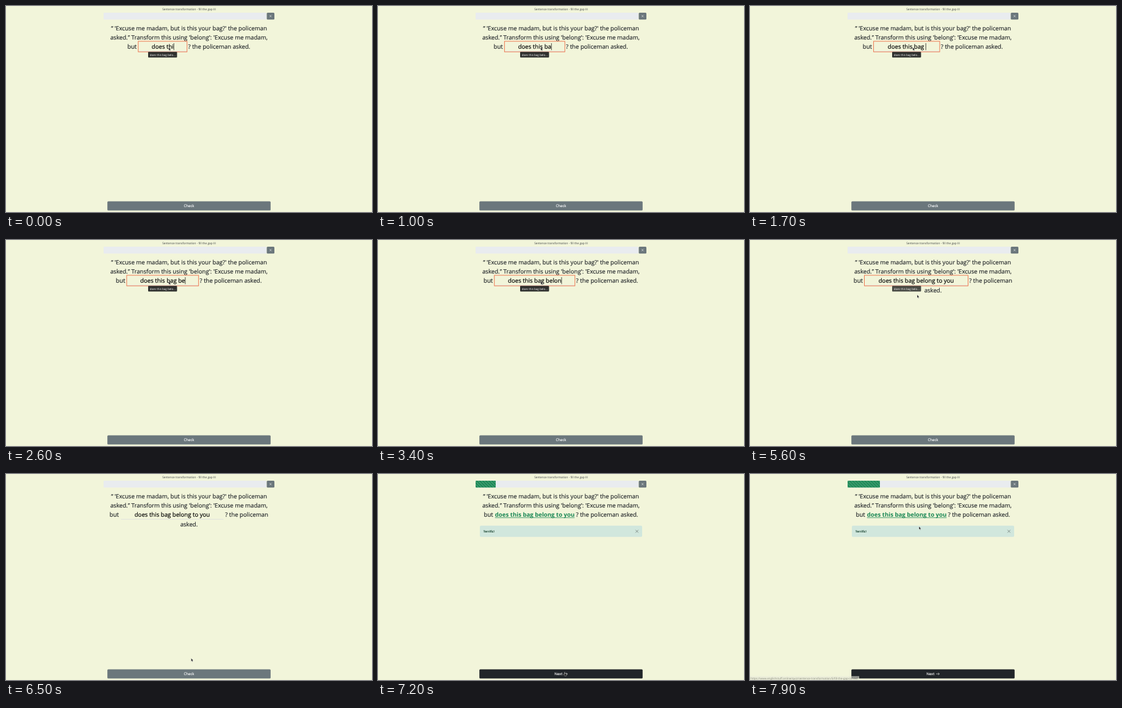
Recreate the animation shown at these times as an HTML page. Size 600x338 px, loop 8 s.

```html
<!DOCTYPE html>
<html lang="en">
<head>
<meta charset="utf-8">
<title>Sentence transformation</title>
<style>
  html, body { margin: 0; width: 100%; height: 100%; overflow: hidden; background: #f2f5da; }
  svg { display: block; width: 600px; height: 338px; }
  text { font-family: "Open Sans", "Noto Sans", sans-serif; white-space: pre; text-rendering: geometricPrecision; }
  .big { font-size: 9.64px; fill: #212529; stroke: #212529; stroke-width: .16px; }
  .input { fill: #000; stroke: #000; stroke-width: .18px; }
  .mid { text-anchor: middle; }
  .btn { font-size: 6.05px; fill: #fff; stroke: #fff; stroke-width: .12px; }
</style>
</head>
<body>
<svg viewBox="0 0 600 338">
  <defs>
    <pattern id="stripes" width="5" height="5" patternUnits="userSpaceOnUse">
      <rect width="5" height="5" fill="#198754"/>
      <path d="M0 0H1.25L5 3.75V5H3.75L0 1.25ZM3.75 0H5V1.25ZM0 3.75L1.25 5H0Z" fill="#fff" opacity=".16"/>
    </pattern>
  </defs>
  <rect width="600" height="338" fill="#f2f5da"/>
  <text class="mid" x="300" y="7.1" font-size="4.78" fill="#3c4043">Sentence transformation - fill the gap III</text>

  <rect x="160" y="11" width="267" height="11.2" rx="1" fill="#e9ecef"/>
  <rect id="bar" x="160" y="11" width="0" height="11.2" rx="1" fill="url(#stripes)"/>
  <rect x="427.5" y="11" width="12.5" height="11.2" rx="1.5" fill="#6b777c"/>
  <path d="M432.1 15l3.2 3.2m0-3.2l-3.2 3.2" stroke="#fff" stroke-width=".6"/>

  <text class="big mid" x="300" y="39.6">“ 'Excuse me madam, but is this your bag?' the policeman</text>
  <text class="big mid" x="300" y="54.7">asked.” Transform this using 'belong': 'Excuse me madam,</text>
  <text class="big" id="but" y="70">but</text>
  <text class="big" id="rest" y="70"></text>
  <text class="big mid" id="wrap" x="300" y="86.3">asked.</text>

  <g id="field">
    <path id="rule" stroke="#dcdfe0" stroke-width=".8"/>
    <rect id="ring" y="57.9" height="17.3" fill="none" stroke="#ee6c44" stroke-width=".9"/>
    <text class="big mid input" id="typed" y="70"></text>
    <path id="caret" stroke="#000" stroke-width=".7"/>
  </g>

  <text id="answer" x="191.8" y="70" font-size="9.6" font-weight="700" fill="#198754">does this bag belong to you</text>
  <path id="under" d="M191.8 71.7H322.3" stroke="#198754" stroke-width=".8"/>

  <g id="alert">
    <rect x="167" y="84.8" width="266" height="18.4" rx="1.9" fill="#d1e7dd"/>
    <text x="172.8" y="95.8" font-size="4.75" font-weight="700" fill="#0a3622">Terrific!</text>
    <path d="M422.2 91.7l4.6 4.6m0-4.6l-4.6 4.6" stroke="#6a746f" stroke-width=".75"/>
  </g>

  <rect id="button" x="166.2" y="320.5" width="267.6" height="15" rx="1.5"/>
  <text class="btn mid" id="check" x="300" y="330.3">Check</text>
  <g id="next">
    <text class="btn" x="289.2" y="330.3">Next</text>
    <path d="M305 328h5.4m-2-2l2 2l-2 2" fill="none" stroke="#fff" stroke-width=".6"/>
  </g>

  <g id="status">
    <rect x="0" y="331.7" width="179" height="6.3" fill="#e9eadb"/>
    <text x="1" y="336.5" font-size="4.55" fill="#40433e">https://www.englishstuff.online/quiz/sentence-transformation/5/fill-the-gap-iii/next</text>
  </g>

  <g id="tip">
    <rect x="233" y="75.2" width="47.4" height="9.2" rx="1" fill="#2f302e"/>
    <text class="mid" x="256.8" y="81.5" font-size="4.55" fill="#fff">does this bag belo...</text>
  </g>
  <g id="mouse">
    <path id="arrow" d="M0 0V5.1L1.2 4.1L2 5.9L2.9 5.5L2.1 3.8H3.6Z" fill="#222" stroke="#fff" stroke-width=".35"/>
    <path id="hand" d="M0 0Q.6-.5 1.1 0V2.3L3.5 2.9Q4 3.2 3.8 4.2L3.2 6H.3L-1.4 3.6Q-1.2 2.9 0 3.7Z" fill="#222" stroke="#fff" stroke-width=".35"/>
  </g>
</svg>
<script>
const LOOP = 8000, STEP = 100, BLUR = 5900, HOVER = 6600, DONE = 7000, STATUS = 7400;
const ANSWER = 'does this bag belong to you';
// [time, letters typed]
const KEYS = [[0, 8], [400, 9], [600, 10], [900, 11], [1000, 12], [1400, 13], [1600, 14], [2100, 15],
  [2600, 16], [3000, 17], [3100, 18], [3400, 19], [3500, 20], [3700, 21], [3900, 23], [4000, 24],
  [4400, 25], [4500, 26], [4700, 27]];
// [time, x, y]
const PATH = [[0, 266.8, 67.8], [5500, 266.8, 67.8], [5600, 274, 89.8], [5800, 281, 113], [6000, 284, 125],
  [6200, 290, 175], [6400, 301, 276], [6500, 303.5, 302.3], [6700, 305.5, 326], [7400, 305.5, 325],
  [7600, 297, 255], [7800, 281, 118], [7900, 277, 86]];

const el = {};
document.querySelectorAll('[id]').forEach(e => el[e.id] = e);
const set = (e, attrs) => { for (const k in attrs) e.setAttribute(k, attrs[k]); };
const show = (e, on) => e.setAttribute('opacity', +on);
const clamp = v => Math.min(1, Math.max(0, v));
const ease = v => 1 - Math.pow(1 - clamp(v), 2.4);

function along(t) {
  const i = Math.max(1, PATH.findIndex(p => p[0] >= t));
  const [a, b] = [PATH[i - 1], PATH[i]], k = (t - a[0]) / (b[0] - a[0]);
  return [a[1] + (b[1] - a[1]) * k, a[2] + (b[2] - a[2]) * k];
}

function drawLine(t, done) {
  const n = KEYS.filter(k => k[0] <= t).pop()[1];
  const wrapped = n > 21 && !done;
  const w = 80 + 4.73 * (n - 8);
  const left = done ? 173.5 : 300.2 - (w + (wrapped ? 91 : 122.4)) / 2;
  const x = left + 17.8, mid = x + w / 2;
  set(el.but, { x: left });
  set(el.rest, { x: done ? 324.6 : x + w + 1.8 });
  el.rest.textContent = wrapped ? '? the policeman' : '? the policeman asked.';
  show(el.wrap, wrapped);
  show(el.field, !done);
  show(el.answer, done);
  show(el.under, done);
  set(el.typed, { x: mid });
  el.typed.textContent = ANSWER.slice(0, n);
  set(el.rule, { d: `M${x + .8} 74.3h${w - 1.6}` });
  set(el.ring, { x, width: w });
  show(el.ring, t < BLUR);
  const end = mid + el.typed.getComputedTextLength() / 2 + .4;
  set(el.caret, { d: `M${end} 61V72.4` });
  const off = t >= 2800 && t < 3000 || t >= 5200 && t < 5700 || t >= BLUR;
  show(el.caret, !off);
}

function draw(t) {
  const done = t >= DONE, over = t >= HOVER && t < 7500;
  drawLine(t, done);
  set(el.bar, { width: 53 * ease((t - DONE) / 600) });
  set(el.stripes, { patternTransform: `translate(${160 - t / 200 % 5} 11)` });
  set(el.alert, { opacity: clamp((t - DONE + 50) / 150) });
  set(el.button, { fill: done ? '#212529' : t >= HOVER ? '#5c636a' : '#6b777c' });
  show(el.check, !done);
  show(el.next, done);
  set(el.status, { opacity: t < STATUS ? 0 : t < 7900 ? clamp((t - STATUS + 100) / 200) : .6 });
  set(el.tip, { opacity: clamp(1 - (t - 5580) / 150) });
  set(el.mouse, { transform: `translate(${along(t)})` });
  show(el.arrow, !over);
  show(el.hand, over);
}

const start = performance.now();
function tick() {
  const t = (performance.now() - start) % LOOP;
  draw(Math.floor(t / STEP) * STEP);
  requestAnimationFrame(tick);
}
tick();
</script>
</body>
</html>
```
